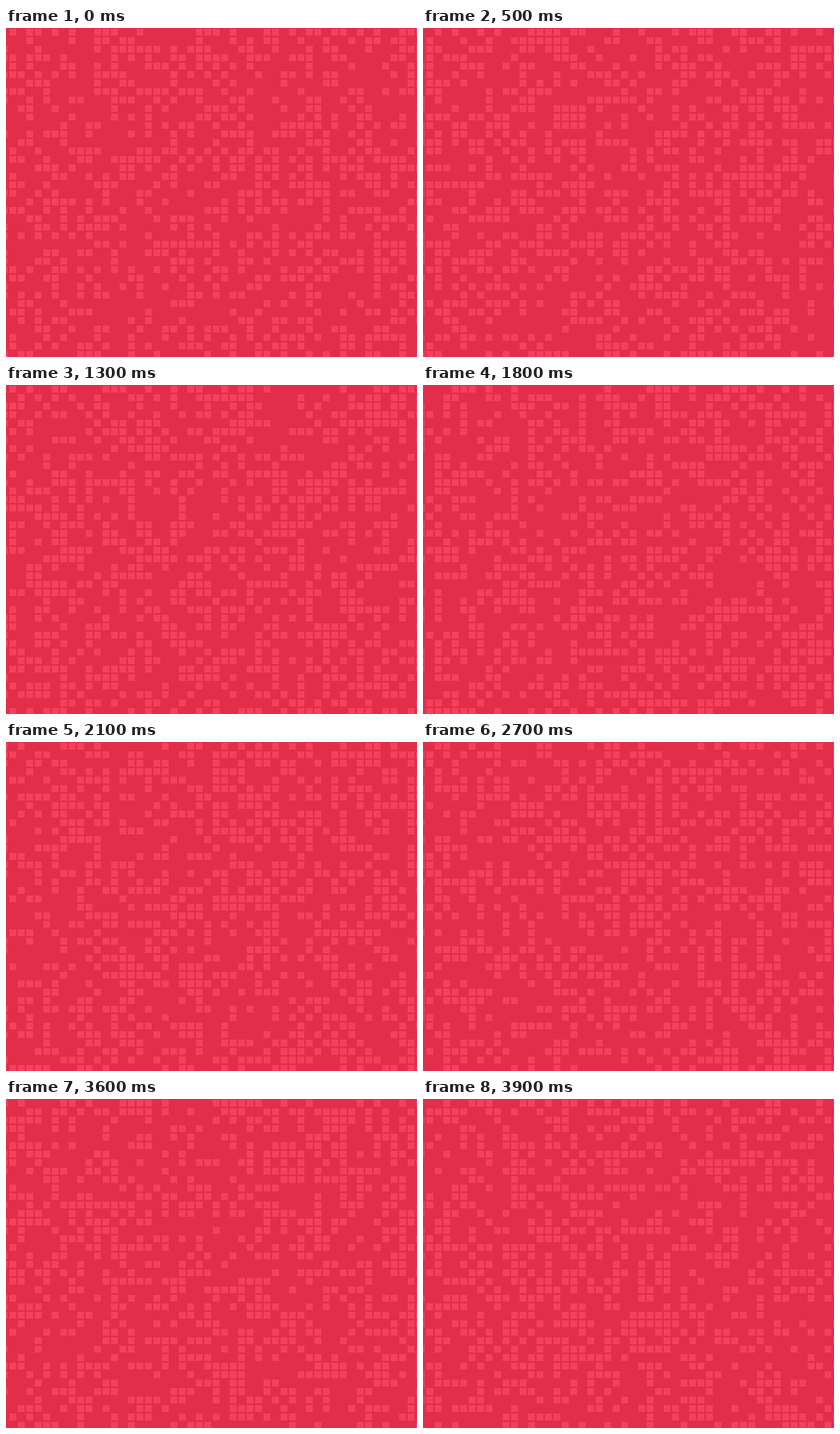
An HTML page with a canvas that plays this animation: 485x388 px, repeating every 4200 ms.

```html
<!DOCTYPE html>
<html>
<head>
<meta charset="utf-8">
<style>
html, body { margin: 0; width: 100%; height: 100%; overflow: hidden; background: #e22e4b; }
canvas { display: block; width: 485px; height: 388px; }
</style>
</head>
<body>
<canvas id="stage" width="485" height="388"></canvas>
<script>
const ctx = document.getElementById('stage').getContext('2d');
const W = 485, H = 388, LOOP = 4200;
// moments at which a fresh pattern appears
const CUTS = [0, 200, 300, 500, 800, 1000, 1200, 1300, 1600, 1800, 1900,
  2100, 2400, 2500, 2700, 2900, 3200, 3400, 3600, 3700, 3900];

function seeded(seed) {
  return () => {
    seed = (seed + 0x6D2B79F5) | 0;
    let t = Math.imul(seed ^ (seed >>> 15), 1 | seed);
    t = (t + Math.imul(t ^ (t >>> 7), 61 | t)) ^ t;
    return ((t ^ (t >>> 14)) >>> 0) / 4294967296;
  };
}

// 8 px squares, 2 px apart, about two in five of them lit
function draw(step) {
  const rnd = seeded(step * 7919 + 17);
  ctx.fillStyle = '#e22e4b';
  ctx.fillRect(0, 0, W, H);
  ctx.fillStyle = '#f5405d';
  for (let y = 1; y < H; y += 10) {
    for (let x = -6; x < W; x += 10) {
      if (rnd() < 0.41) ctx.fillRect(x, y, 8, 8);
    }
  }
}

let shown = -1;
const start = performance.now();
function tick() {
  const t = (performance.now() - start) % LOOP;
  const step = CUTS.filter(cut => cut <= t).length - 1;
  if (step !== shown) draw(shown = step);
  requestAnimationFrame(tick);
}
tick();
</script>
</body>
</html>
```
